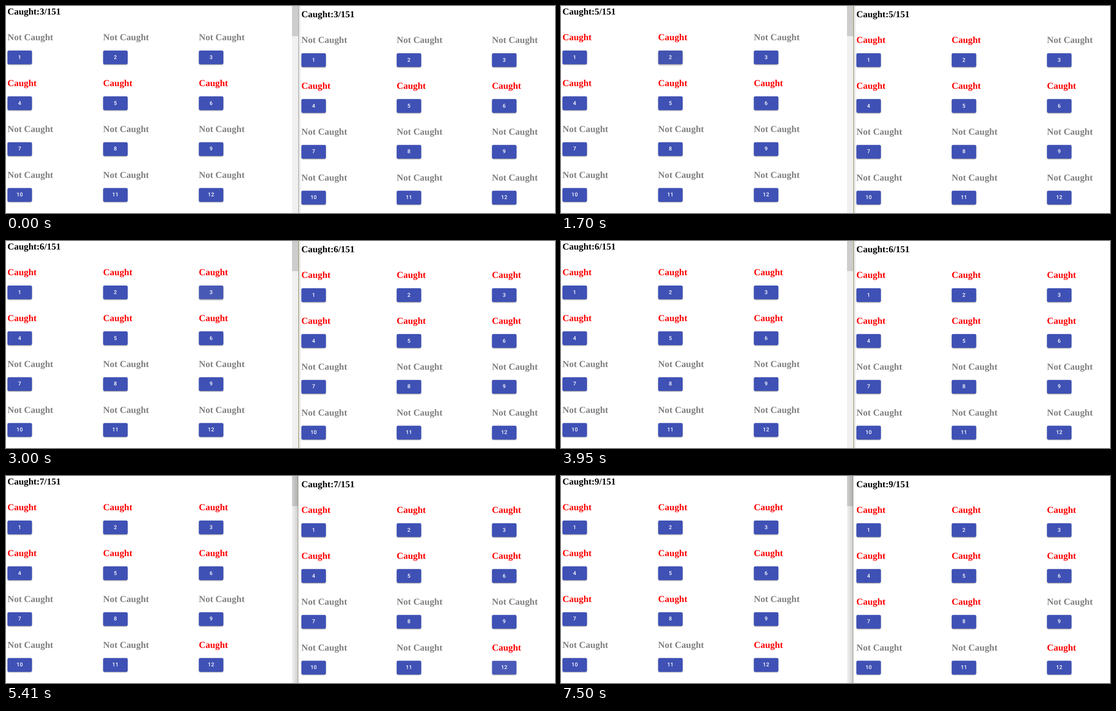
An HTML page that plays this animation: 1217 px wide and 460 px high, repeating every 8 s.

```html
<!DOCTYPE html>
<html lang="en">
<head>
<meta charset="utf-8">
<style>
html, body { margin: 0; width: 100%; height: 100%; overflow: hidden; background: #fff; }
div { position: absolute; left: 0; top: 0; white-space: pre; transform-origin: 0 0; }
.text {
  font: bold 24px/28px "Liberation Serif", "Times New Roman", serif;
  text-rendering: geometricPrecision;
}
.button {
  width: 64px; height: 36px; border-radius: 4px; color: #fff; text-align: center;
  font: 500 14px/36px Roboto, sans-serif; letter-spacing: .4px;
  text-rendering: geometricPrecision;
}
#track { left: 634px; width: 14px; height: 460px; background: #f0f0f0; }
#thumb { left: 634px; width: 14px; height: 67px; background: #cdcdcd; }
#shade, #edge { height: 460px; }
#edge { width: 1px; }
</style>
</head>
<body>
<div id="track"></div><div id="thumb"></div><div id="shade"></div><div id="edge"></div>
<script>
const LOOP = 8000, ZOOM = .85, ROW = 101.85;
// Times in ms: hover begins, press, label changes, ripple gone.
const clicks = [
  { n: 1, side: 0, hover: 790, press: 790, change: 880, end: 1080 },
  { n: 2, side: 0, hover: 1290, press: 1420, change: 1560, end: 1950 },
  { n: 3, side: 0, hover: 2200, press: 2700, change: 2830, end: 3370 },
  { n: 12, side: 1, hover: 4700, press: 5080, change: 5200, end: 5830 },
  { n: 8, side: 1, hover: 6040, press: 6130, change: 6220, end: 6410 },
  { n: 7, side: 1, hover: 6750, press: 7120, change: 7230, end: 7500 }
];
const panes = [{ x: 3.2, y: 0, step: 212.15 }, { x: 654.8, y: 6, step: 211.25 }];
const clamp = v => Math.max(0, Math.min(1, v));
const smooth = v => { v = clamp(v); return v * v * (3 - 2 * v); };
const mix = (a, b, k) => a + (b - a) * k;

function add(kind, x, y, text = "") {
  const el = document.createElement("div");
  el.className = kind;
  el.style.transform = `translate(${x}px, ${y}px) scale(${ZOOM})`;
  el.textContent = text;
  return document.body.appendChild(el);
}

for (const p of panes) {
  p.title = add("text", p.x, p.y + 1.2);
  p.cells = Array.from({ length: 12 }, (_, i) => {
    const x = p.x + i % 3 * p.step;
    const y = p.y + Math.floor(i / 3) * ROW;
    return { label: add("text", x, y + 58.6), button: add("button", x, y + 99, i + 1) };
  });
}

function paintButton(el, t, c) {
  let hover = 0, ripple = 0, radius = 0;
  if (c && t >= c.hover && t < c.end) {
    const leave = smooth((t - c.change) / Math.min(250, c.end - c.change));
    hover = smooth((t - c.hover + 50) / 180) * (1 - leave);
    ripple = .3 * (1 - clamp((t - c.change) / (c.end - c.change))) ** 4;
    radius = 70 * (1 - (1 - clamp((t - c.press) / 300)) ** 2);
  }
  const m = (a, b) => mix(a, b, hover);
  const px = (a, b) => m(a, b) + "px";
  el.style.backgroundColor = `rgb(${m(63, 48)},${m(81, 63)},${m(181, 159)})`;
  el.style.boxShadow =
    `0 ${px(3, 2)} ${px(1, 4)} ${px(-2, -1)} rgba(0,0,0,.2),` +
    `0 ${px(2, 4)} ${px(2, 5)} rgba(0,0,0,.14),` +
    `0 1px ${px(5, 10)} rgba(0,0,0,.12)`;
  el.style.backgroundImage = radius
    ? `radial-gradient(circle at 60% 55%, rgba(255,255,255,${ripple}) ${radius}px, transparent ${radius + 1}px)`
    : "none";
}

// The window in front has the darker edge and casts its shadow on the other.
function paintDivider(t) {
  const right = t >= 5080;
  const active = t >= 790;
  edge.style.left = right ? "647px" : "648px";
  edge.style.background = right ? "#8a8672" : active ? "#8b8247" : "#969696";
  shade.style.left = right ? "635px" : "649px";
  shade.style.width = right ? "12px" : "6px";
  shade.style.background =
    `linear-gradient(to ${right ? "left" : "right"}, rgba(0,0,0,${active ? .14 : .12}), transparent)`;
}

function draw(now) {
  const t = now % LOOP;
  const done = clicks.filter(c => t >= c.change).map(c => c.n);
  panes.forEach((p, side) => {
    p.title.textContent = `Caught:${3 + done.length}/151`;
    p.cells.forEach(({ label, button }, i) => {
      const n = i + 1;
      const caught = (n > 3 && n < 7) || done.includes(n);
      label.textContent = caught ? "Caught" : "Not Caught";
      label.style.color = caught ? "red" : "gray";
      paintButton(button, t, clicks.find(c => c.n === n && c.side === side));
    });
  });
  paintDivider(t);
}

const start = performance.now();
(function frame() {
  draw(performance.now() - start);
  requestAnimationFrame(frame);
})();
</script>
</body>
</html>
```
